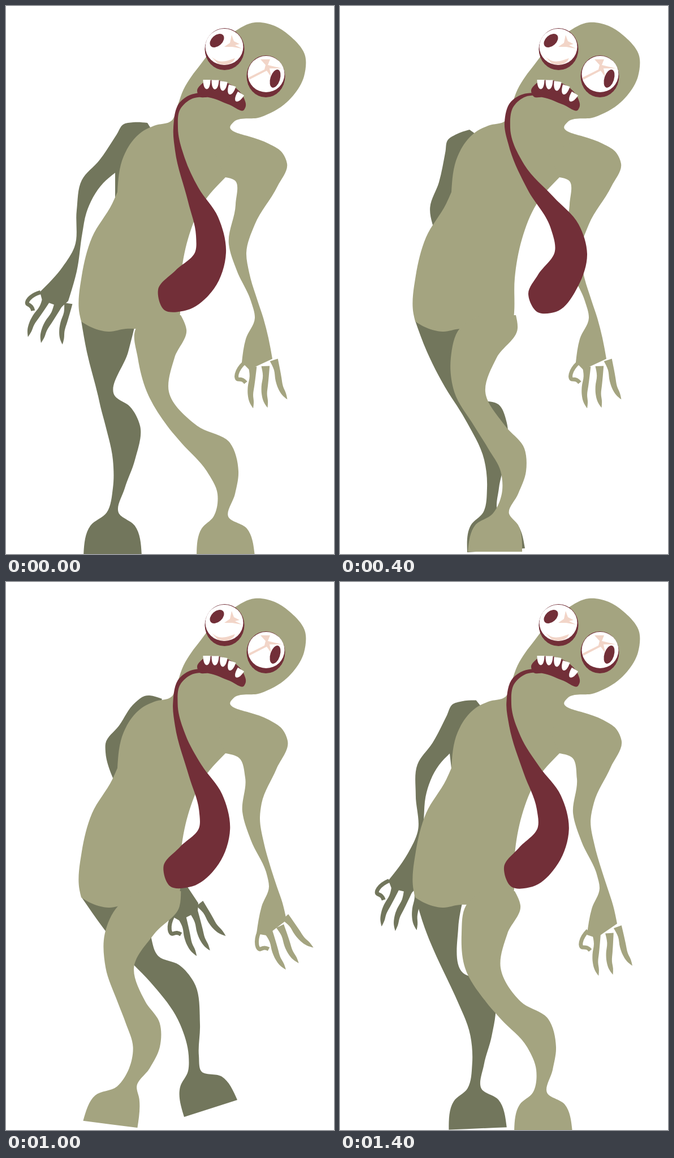
These frames come from a looping animation (580x966 px, 1600 ms). An HTML page:

```html
<!DOCTYPE html>
<html lang="en">
<head>
<meta charset="utf-8">
<title>Zombie walk</title>
<style>
html, body { margin: 0; width: 100%; height: 100%; overflow: hidden; background: #fff; }
svg { display: block; width: 100%; height: 100%; }
</style>
</head>
<body>
<svg id="stage" viewBox="0 0 580 966"></svg>
<script>
const LIGHT = '#a4a480', DARK = '#72765c', RED = '#722f38', VEIN = '#f2d5c8';
const STEP = 200;

// "x,y" points; a trailing "!" marks a corner.
const points = text => text.trim().split(/\s+/).map(s =>
  [...s.replace('!', '').split(',').map(Number), s.endsWith('!')]);

// Blends numbers or equally nested lists of numbers.
const mix = (a, b, t) => Array.isArray(a) ? a.map((v, i) => mix(v, b[i], t)) : a + (b - a) * t;

// Closed smooth outline through the points.
function outline(pts) {
  const n = pts.length, at = i => pts[(i + n) % n];
  const seg = i => {
    const a = at(i), b = at(i + 1), len = Math.hypot(b[0] - a[0], b[1] - a[1]) || 1;
    return { len, dir: [(b[0] - a[0]) / len, (b[1] - a[1]) / len] };
  };
  const tangent = i => {
    const p = seg(i - 1), q = seg(i);
    return mix(p.dir, q.dir, p.len / (p.len + q.len));
  };
  let d = `M${pts[0][0]} ${pts[0][1]}`;
  for (let i = 0; i < n; i++) {
    const a = at(i), b = at(i + 1), { len, dir } = seg(i), k = len / 3;
    let u = tangent(i), v = tangent(i + 1);
    if (a[2] && b[2]) u = v = dir;
    else if (a[2]) u = mix(v, dir, 1.5);
    else if (b[2]) v = mix(u, dir, 1.5);
    const c = [a[0] + u[0] * k, a[1] + u[1] * k, b[0] - v[0] * k, b[1] - v[1] * k, b[0], b[1]];
    d += 'C' + c.map(w => w.toFixed(1)).join(' ');
  }
  return d + 'Z';
}

const fillPath = (fill, d) => `<path fill="${fill}" d="${d}"/>`;
const shape = (fill, pts) => fillPath(fill, outline(typeof pts === 'string' ? points(pts) : pts));
const group = (transform, ...parts) => `<g transform="${transform}">${parts.join('')}</g>`;
const place = (x, y, deg = 0) => `translate(${x} ${y}) rotate(${deg})`;
const oval = (fill, x, y, rx, ry, deg) =>
  group(place(x, y, deg), `<ellipse fill="${fill}" rx="${rx}" ry="${ry}"/>`);

// One wavy finger repeated three times, plus a curled thumb.
const FINGER = '-7,-4! -5,12 -8,30 -8,43 -5,56 1,66! 2,56 1,43 3,28 5,13 7,-4!';
function fingers(fill, [x, y, deg, squeeze = 1]) {
  return group(`${place(x, y, deg)} scale(${squeeze} 1) translate(-465 -705)`,
    ...[[436, 640, 0], [459, 639, -2], [475, 628, -18]].map(p =>
      group(place(...p) + ' scale(1.05)', shape(fill, FINGER))),
    `<path fill="none" stroke="${fill}" stroke-width="7" d="M421 629C406 643 405 658 411 658S420 659 424 664"/>`);
}

// Rows are [y, left, right] from hip to ankle; the last row is the sole from heel to toe.
function leg(rows) {
  const slices = rows.slice(0, -1), [x1, y1, x2, y2] = rows.at(-1);
  const left = slices.map(([y, l], i) => [l, y, !i]);
  const right = slices.map(([y, , r], i) => [r, y, !i]);
  const len = Math.hypot(x2 - x1, y2 - y1), c = (x2 - x1) / len, s = (y2 - y1) / len;
  const bulge = ([ax, ay], x, y) => {
    const along = .7 * ((x - ax) * c + (y - ay) * s), down = .3 * ((y - ay) * c - (x - ax) * s);
    return [ax + along * c - down * s, ay + along * s + down * c];
  };
  return [...left, bulge(left.at(-1), x1, y1), [x1, y1, true],
    [x2, y2, true], bulge(right.at(-1), x2, y2), ...right.reverse()];
}

const BODY = `388,302! 347,350 322,410 309,480 308,540 306,562! 228,569! 212,569 182,574 148,565 133,556!
  130,543 134,475 152,408 188,348 197,328! 208,265 222,240 240,222 262,211 293,202 304,174 314,147 328,124
  344,103 356,87! 401,47! 440,29 475,35 500,51 529,88 527,124 496,170 450,196 402,205 397,211 430,230!`;

const MOUTH = `338,150 349,135! 362,131 380,132 400,140 421,163 424,176 421,183 395,174 358,161 343,160`;
const VEINS = ['399,51! 403,62! 413,67! 405,69! 417,75! 400,72! 386,72! 396,65!',
  '364,90! 373,96 405,92! 402,97 391,103 374,101!',
  '430,130! 429,126! 457,112! 459,104! 450,94! 467,94! 463,104! 488,110! 466,110! 469,125! 461,114!'];

const tooth = (_, i) => group(place(355 + 15 * i, 131 + .375 * i ** 3, 2 * i * i),
  fillPath('#fff', 'M-6.5-1C-6.5 21 6.5 21 6.5-1Z'));

const FACE = [
  oval(RED, 386.5, 76, 35, 37), oval('#fff', 386, 72, 33.5, 32),
  oval(RED, 459.5, 124, 34, 37), oval('#fff', 460, 120, 32.5, 32),
  ...VEINS.map(v => shape(VEIN, v)),
  oval(RED, 373, 61, 14.5, 9.5, -42), oval(RED, 476, 128, 8.5, 16.5, 18),
  shape(RED, MOUTH), ...Array.from({ length: 5 }, tooth)
].join('');

const TONGUE = [
  `343,153! 325,157 308,169 296,215 299,255 322,345 336,405 335,432 300,466 269,500 280,536 320,536 368,498
   389,435 375,372 340,320 316,268 304,215 308,182 330,163 355,161!`,
  `343,153! 322,156 302,169 291,205 299,248 332,324 372,390 380,432 350,474 333,507 350,540 382,539 422,492
   437,437 422,385 378,337 326,280 301,215 307,177 328,160 350,158!`].map(points);

const ARM = [
  `430,230! 465,243 488,258 497,278 480,318 440,385 425,435 430,470 445,520 455,550 464,585 471,622! 430,641!
   417,628! 424,587 440,550 433,520 408,466 394,420 406,350 404,307 388,302! 370,260!`,
  `430,230! 465,243 489,260 498,280 478,330 452,390 449,415 456,460 467,500 479,537 489,566 496,596! 461,623!
   443,620! 452,572 465,537 461,515 433,455 418,405 423,345 412,310 388,302! 370,260!`].map(points);

// Far arm hanging straight, swung about the shoulder.
const STRAIGHT = `262,225! 250,206! 225,205 207,209 196,226 165,272 134,307 125,360 121,425 100,460 60,504!
  64,519! 98,531! 110,520! 125,468 135,400 142,365 172,312 193,294! 193,347! 240,300!`;
const swung = (x, y, deg) => group(`translate(${x} ${y}) rotate(${deg} 200 215)`,
  shape(DARK, STRAIGHT), fingers(DARK, [65.7, 592.3, 27]));

// Far arm bent behind the body, with the hand showing in front.
const ELBOW = '276,206! 245,201 228,213 200,253 176,285 176,300 190,348! 240,300!';
const bent = (x, y, palm, hand) =>
  group(place(x, y), shape(DARK, ELBOW)) + shape(DARK, palm) + fingers(DARK, hand);

const near = {
  wide: [[545, 250, 309], [570, 229, 319], [620, 233, 298], [680, 249, 288], [740, 285, 338],
    [770, 310, 396], [820, 355, 411], [860, 374, 405], [900, 367, 393], [337, 970, 440, 970]],
  closing: [[545, 250, 309], [570, 223, 319], [620, 215, 296], [680, 221, 284], [740, 258, 320],
    [770, 284, 368], [820, 331, 382], [860, 347, 376], [900, 341, 366], [308, 970, 411, 970]],
  together: [[545, 250, 311], [568, 212, 314], [620, 196, 277], [680, 202, 257], [740, 237, 292],
    [780, 262, 326], [820, 284, 329], [860, 286, 315], [895, 270, 299], [226, 962, 322, 962]],
  crossed: [[545, 230, 308], [575, 186, 301], [620, 158, 251], [680, 156, 202], [740, 166, 211],
    [775, 172, 229], [820, 178, 227], [855, 164, 206], [885, 138, 178], [66, 940, 162, 962]]
};
const far = {
  wide: [[555, 133, 230], [610, 143, 216], [688, 163, 193], [706, 167, 219], [740, 176, 237],
    [800, 189, 228], [850, 189, 210], [893, 178, 199], [137, 970, 240, 970]],
  together: [[555, 133, 212], [610, 154, 205], [690, 197, 232], [705, 207, 283], [735, 225, 295],
    [800, 255, 292], [850, 260, 281], [893, 253, 280], [225, 963, 327, 956]],
  passing: [[555, 133, 225], [610, 172, 252], [660, 211, 270], [675, 226, 306], [705, 255, 332],
    [780, 308, 343], [835, 323, 341], [862, 322, 345], [315, 943, 409, 913]],
  crossed: [[555, 132, 262], [605, 160, 283], [690, 246, 317], [705, 264, 362], [740, 304, 387],
    [790, 357, 397], [840, 381, 402], [880, 389, 406], [364, 964, 475, 933]]
};

// tongue and arm are blend amounts; hand is [x, y, angle].
const wide = { tongue: 0, arm: 0, hand: [465, 705, 0], near: near.wide, far: far.wide, back: swung(0, 0, 0) };
const closing = {
  tongue: .33, arm: .76, hand: [485, 689, -2], near: near.closing,
  far: mix(far.wide, far.together, .63), back: swung(-8, 8, -6.5)
};
const together = { ...wide, tongue: 1, near: near.together, far: far.together, back: swung(-14, 30, -22) };
const passing = {
  tongue: .15, arm: 1, hand: [518.7, 668, -24],
  near: mix(near.together, near.crossed, .56), far: far.passing,
  back: bent(0, 0, '300,535! 320,536! 340,566! 339,581! 307,597! 291,588!', [362, 645.7, -20])
};
const crossed = {
  ...wide, tongue: -.5, near: near.crossed, far: far.crossed,
  back: bent(-12, 9, '315,515! 330,508! 345,527 372,562! 374,582! 338,606! 327,590! 317,545', [372, 640, -10, .7])
};

function draw(pose, lift) {
  const slack = Math.max(0, -12 * pose.tongue);
  return group(place(0, -lift),
    pose.back, shape(DARK, leg(pose.far)),
    shape(LIGHT, BODY), shape(LIGHT, leg(pose.near)),
    shape(LIGHT, mix(...ARM, pose.arm)), fingers(LIGHT, pose.hand),
    FACE, group(place(slack, 0), shape(RED, mix(...TONGUE, pose.tongue))));
}

const cycle = [
  [wide, 0], [closing, 2], [together, 0], [passing, 2],
  [crossed, 0], [passing, 0], [together, 0], [closing, 0]
].map(step => draw(...step));

const stage = document.getElementById('stage');
const start = performance.now();
let shown = -1;
function tick() {
  const i = Math.floor((performance.now() - start) / STEP) % cycle.length;
  if (i !== shown) stage.innerHTML = cycle[shown = i];
  requestAnimationFrame(tick);
}
tick();
</script>
</body>
</html>
```
